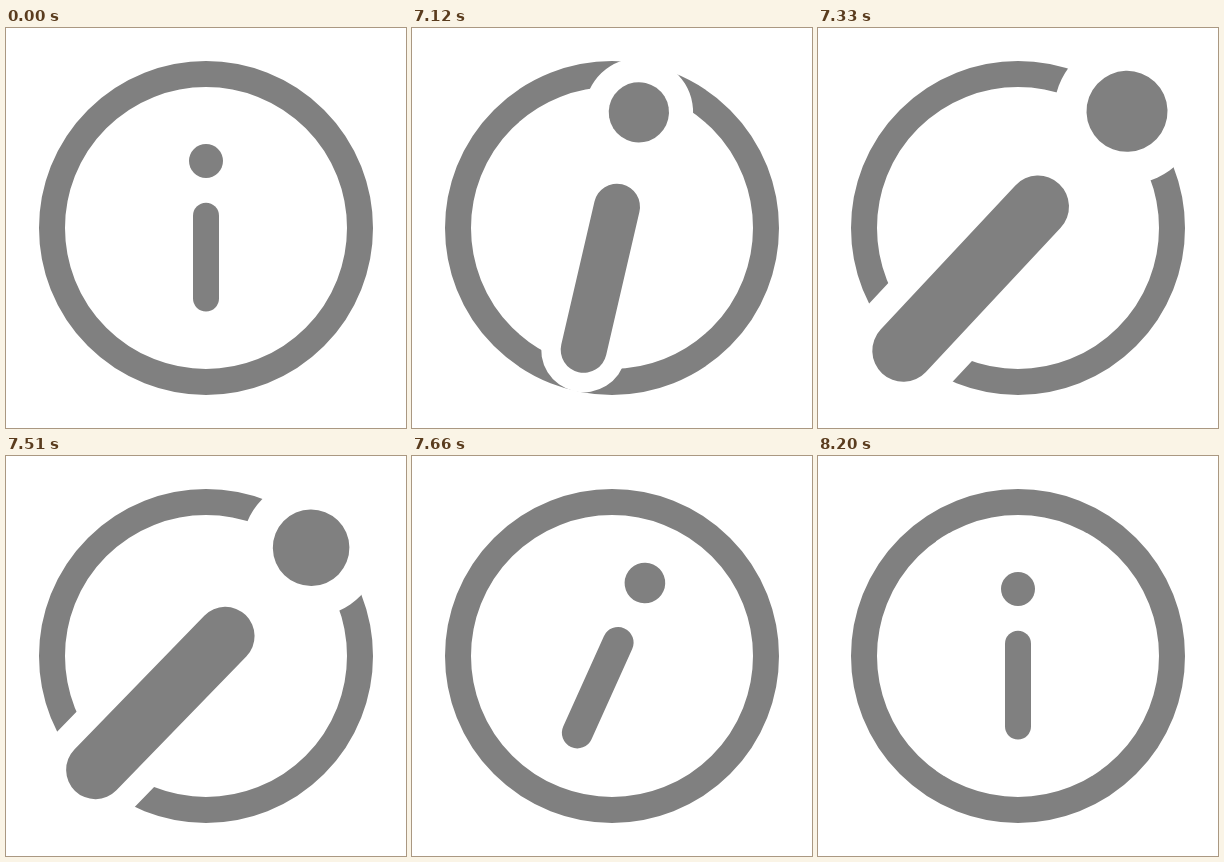
An HTML page without scripts for the animation above (8.26 s loop, 400x400 px).

```html
<!DOCTYPE html>
<html lang="en">
<head>
<meta charset="utf-8">
<title>Info icon</title>
<style>
  html, body { margin: 0; width: 100%; height: 100%; overflow: hidden; background: #fff; }
  svg { display: block; width: 100%; height: 100%; }
  .ring, .bar { fill: none; stroke: #808080; stroke-width: 26; stroke-linecap: round; }
  .dot { fill: #808080; }
  .gap .bar { stroke: #fff; stroke-width: 48; }
  .gap .dot { fill: #fff; }
  .mark {
    transform-origin: 200px 200px;
    animation: turn 8260ms infinite, grow 8260ms infinite;
  }
  /* swing out 7020-7440 ms, back 7440-7840, settle until 8200 */
  @keyframes turn {
    0% { rotate: 0deg; animation-timing-function: linear; }
    84.988% { rotate: 0deg; animation-timing-function: cubic-bezier(.33, 0, .2, 1); }
    90.073% { rotate: 45deg; animation-timing-function: cubic-bezier(.88, 0, .32, 1); }
    94.915% { rotate: -6deg; animation-timing-function: cubic-bezier(.33, 0, .33, 1); }
    99.274%, 100% { rotate: 0deg; }
  }
  /* the size peaks a little before the turn, at 7380 ms */
  @keyframes grow {
    0% { scale: 1; animation-timing-function: linear; }
    84.988% { scale: 1; animation-timing-function: cubic-bezier(.25, 0, .1, 1); }
    89.346% { scale: 2.395; animation-timing-function: cubic-bezier(.68, 0, .38, 1); }
    94.915% { scale: .75; animation-timing-function: cubic-bezier(.33, 0, .33, 1); }
    99.274%, 100% { scale: 1; }
  }
</style>
</head>
<body>
<svg viewBox="0 0 400 400" role="img" aria-label="Information">
  <circle class="ring" cx="200" cy="200" r="154"/>
  <g class="mark">
    <g class="gap">
      <circle class="dot" cx="200" cy="133" r="30.6"/>
      <path class="bar" d="M200 187.7V270.5"/>
    </g>
    <circle class="dot" cx="200" cy="133" r="17"/>
    <path class="bar" d="M200 187.7V270.5"/>
  </g>
</svg>
</body>
</html>
```
